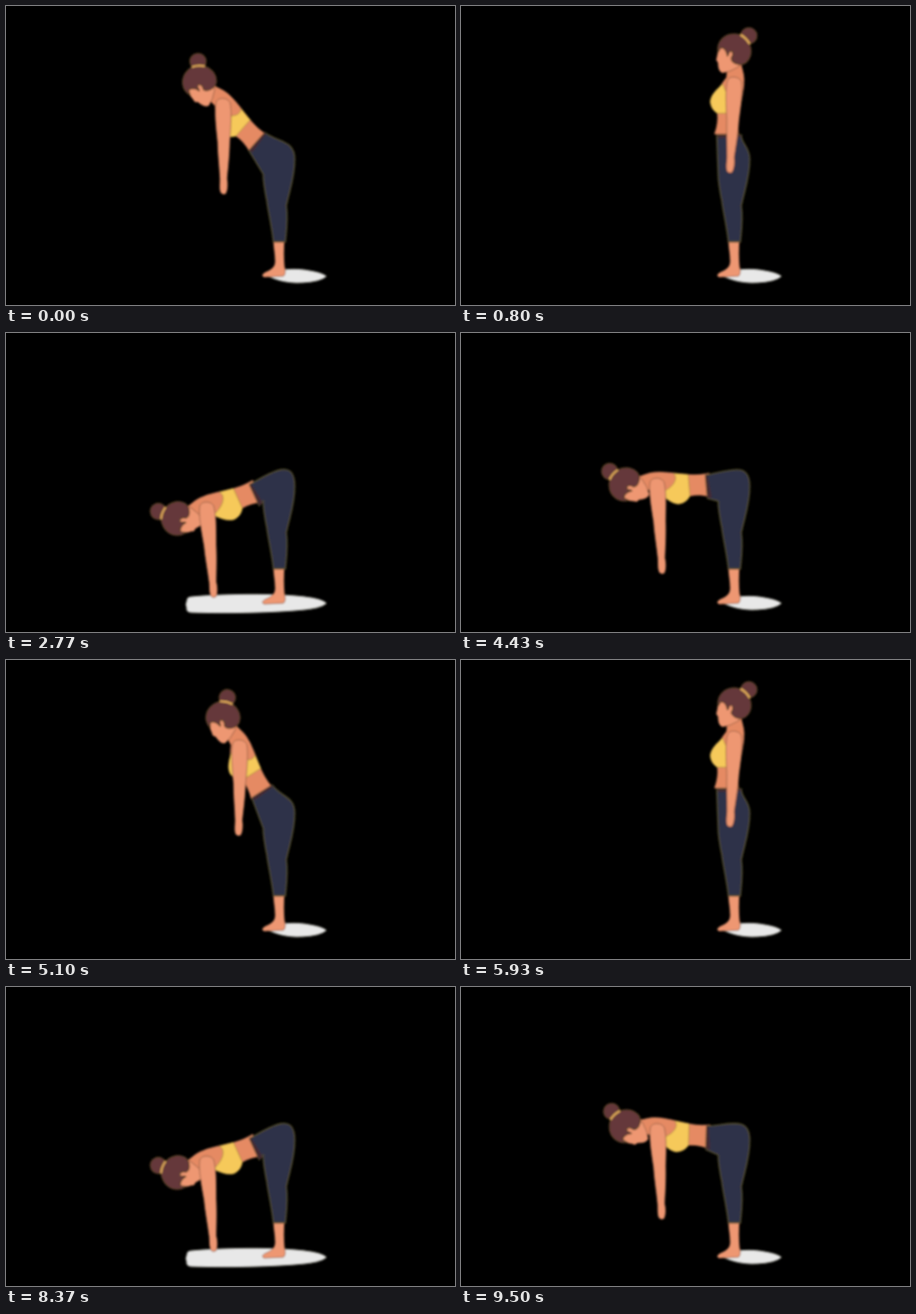
These frames come from a looping animation (482 by 322 pixels, 9530 ms). An HTML page:

```html
<!DOCTYPE html>
<html lang="en">
<head>
<meta charset="utf-8">
<title>Forward bend</title>
<style>
  html, body { margin: 0; width: 100%; height: 100%; overflow: hidden; background: #000; }
  svg { display: block; width: 100vw; height: 100vh; }
  .skin { fill: #ee9772; stroke: #8c5a40; stroke-width: .7; }
  .shade { fill: #e58a63; }
  .hair { fill: #65393a; stroke: #5a4222; stroke-width: 1; }
  .top { fill: #f6c95a; stroke: #a08438; stroke-width: .6; }
  .mat { fill: #e8e8e8; stroke: #86867c; stroke-width: 1; }
  .legs { fill: #2f314a; stroke: #55502c; stroke-width: 1.3; }
  .band { fill: #452a32; }
</style>
</head>
<body>
<svg viewBox="0 0 482 322">
  <defs>
    <filter id="soft" filterUnits="userSpaceOnUse" x="0" y="0" width="482" height="322">
      <feGaussianBlur stdDeviation=".9"/>
    </filter>
  </defs>
  <rect width="482" height="322"/>
  <g filter="url(#soft)">
    <path class="mat" d="M278 289C292 283 312 282 326 285Q339 287 344 291Q338 297 318 298C300 299 286 294 278 289Z"/>
    <path id="mat" class="mat" d="M199 284C230 281 290 280 320 284Q339 286 344 291Q338 297 310 299C270 302 225 302 198 301Q193 300 194 296Q192 292 194 289Q194 284 199 284Z"/>
    <path class="skin" d="M287 250H299C298 262 298 272 299 281Q301 288 298 291L277 292Q273 290 278 287C285 284 289 281 289 275C289 267 287 259 287 250Z"/>

    <g id="torso">
      <path class="skin shade" d="M286 62L300 58C301 66 304 72 304 79C304 90 301 102 299 112C297 124 297 130 298 138H272C275 130 276 122 275 115L273 100C275 90 281 82 285 77Z"/>
      <path class="top" d="M281 84C274 90 268 96 267.5 103C268 109 271 113 275 115.5H298.5L301 100C296 105 286 100 281 84Z"/>
      <circle class="shade" cx="293" cy="85" r="10.5"/>
      <path class="skin" d="M279 42C275 47 276 52 274 58L276 61C276 66 277 71 281 72L289 70L299 65L297 44Z"/>
      <circle class="hair" cx="309" cy="32" r="8.8"/>
      <path class="hair" d="M276 50C274 38 283 29 295 30C307 31 313 42 311 53C309 60 304 64 298 63C293 62 290 59 290 56C293 53 292 48 289 49C287 50 288 53 286 54C285 48 282 45 279 45Z"/>
      <path d="M300 31Q306 34 310 41" fill="none" stroke="#e6b05a" stroke-width="2"/>
    </g>

    <path id="legs" class="legs"/>
    <path id="band" class="band"/>
    <path id="arm" class="skin" d="M-7 0C-6 -6 5 -6 8 0C10 10 8.5 25 7 42C6.5 58 4.5 72 3.5 82C4.5 88 4 94 2 98Q-1 100 -3.5 97C-5 92 -4 88 -4 82C-4.5 68 -6 55 -6 42C-7.5 25 -9 10 -7 0Z"/>
  </g>
</svg>
<script>
const LOOP = 9530, SWING = 1800, BEND = 114.3;
const RISES = [-982, 3945, 8930];
const BENDS = [1125, 6083];
const DROP = 880;          // the bend cuts to the floor pose after this long
const HIP = { x: 288, y: 159 };
const el = id => document.getElementById(id);
const [mat, torso, legs, band, arm] = ["mat", "torso", "legs", "band", "arm"].map(el);

const ease = u => (1 - Math.cos(Math.PI * Math.min(1, Math.max(0, u)))) / 2;
const latest = (starts, t) => Math.max(-LOOP, ...starts.filter(s => s <= t));

function pose(t) {
  const up = latest(RISES, t), down = latest(BENDS, t);
  if (up > down) return { angle: BEND * (1 - ease((t - up) / SWING)), floor: t - up < 60 };
  const floor = t - down >= DROP;
  return { angle: floor ? BEND : BEND * ease((t - down) / SWING), floor };
}

// Position of a point, given relative to the hip, after leaning forward
function lean(x, y, angle) {
  const a = angle * Math.PI / 180, c = Math.cos(a), s = Math.sin(a);
  return [HIP.x + x * c + y * s, HIP.y - x * s + y * c];
}

const pt = p => p.map(v => v.toFixed(2)).join(" ");

function draw(t) {
  const { angle, floor } = pose(t), k = angle / BEND;
  const at = (x, y) => pt(lean(x, y, angle));
  const waist = -20 - 6 * k, belly = -13.5 - 4.5 * k, spine = 13 - 6 * k;
  const front = at(belly, waist), back = at(spine, waist);

  mat.style.display = floor ? "" : "none";
  torso.setAttribute("transform", `rotate(${-angle} ${HIP.x} ${HIP.y})`);
  legs.setAttribute("d", `M${front}L${back}C${at(13 - 2 * k, -10 + 16 * k)} 310 ${151 - 15 * k} 310 165` +
    "C310 185 304 200 301 215C303 230 301 242 300 254H287C285 235 281 220 280 210C277 195 276 188 276 181Z");
  band.setAttribute("d", `M${front}L${back}L${at(spine, waist + 2)}L${at(belly + 1, waist + 3 + 2 * k)}Z`);
  arm.setAttribute("transform", `translate(${at(5, -78)}) rotate(${2.3 - 7.4 * k})`);
}

const start = performance.now();
function tick() {
  draw((performance.now() - start) % LOOP);
  requestAnimationFrame(tick);
}
tick();
</script>
</body>
</html>
```
